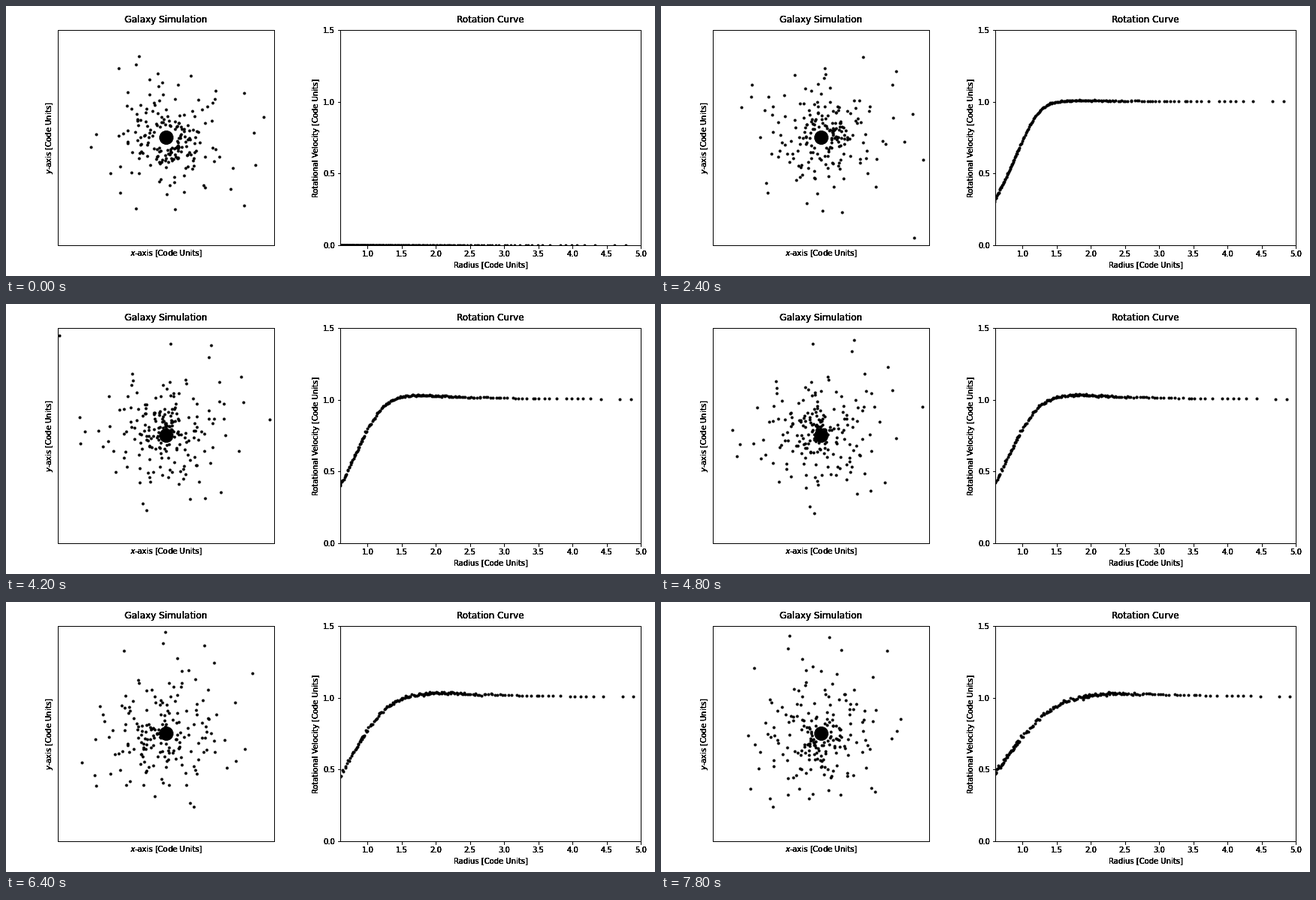
Write a matplotlib script that moves like this. It is 864 by 360 pixels and loops after 8 s.

```python
import numpy as np
import matplotlib.pyplot as plt
from matplotlib.animation import FuncAnimation

W, H, DPI = 864, 360, 72
FRAMES, INTERVAL, DT = 40, 200, 0.2
STARS = 200

plt.rcParams.update({"font.family": "DejaVu Sans", "font.size": 10})
rng = np.random.default_rng(12)

# The farthest stars: radius, angle in degrees
FAR = np.array([(6.71, 101), (6.32, -69), (4.78, -41), (4.62, 12),
                (4.33, -17), (4.18, 30), (4.07, 3), (3.99, 108)])


def start_state():
    """Exponential disc with a hole in the middle, plus the far stars."""
    inner = STARS - len(FAR)
    u = (np.arange(inner) + rng.random(inner)) / STARS
    r = 0.55 - 1.07 * np.log(1 - u)
    angle = rng.uniform(0, 2 * np.pi, inner)
    return np.append(r, FAR[:, 0]), np.append(angle, np.radians(FAR[:, 1]))


R0, ANGLE0 = start_state()
GAIN = 0.034 * np.clip((R0 - 0.95) / 0.55, 0, 1)
SINK = 0.75 * np.clip((0.9 - R0) / 0.3, 0, 1) ** 2
DRIFT = rng.normal(0, 0.009, STARS) * np.exp(-(R0 / 2.5) ** 4)


def radius(n):
    """Outer stars spiral out slowly, the core falls in and rebounds."""
    fall = np.interp(n, [0, 32, 39], [0, 1, 0.55]) ** 2
    return np.sqrt(R0 ** 2 + GAIN * n) * (1 - SINK * fall)


def speed(n, r):
    """Power-law rise into a flat curve; a low hump grows and moves out."""
    t = n / (FRAMES - 1)
    rise = (0.68 + 0.12 * np.sin(0.8 * np.pi * t) ** 2) * r ** (2 - 1.1 * t)
    flat = rise / (1 + rise ** 6) ** (1 / 6)
    height = 0.04 * np.clip((t - 0.15) / 0.35, 0, 1)
    hump = height * np.minimum(1, ((1.2 + 1.2 * t ** 1.5) / r) ** 2)
    return flat * (1 + hump) + DRIFT * t


def run():
    angle, states = ANGLE0.copy(), []
    for n in range(FRAMES):
        r = radius(n)
        v = speed(n, r)
        shown = v if n else np.zeros_like(v)
        states.append((r * np.cos(angle), r * np.sin(angle), r, shown))
        angle = angle + np.arctan(DT * v / r)
    return states


STATES = run()
fig = plt.figure(figsize=(W / DPI, H / DPI), dpi=DPI, facecolor="white")


def panel(name, left, width, title, xlabel, ylabel):
    ax = fig.add_axes([left / W, 41 / H, width / W, 287 / H], label=name)
    ax.patch.set_visible(False)
    ax.set_title(title, fontsize=12, pad=10)
    ax.set_xlabel(xlabel)
    ax.set_ylabel(ylabel)
    return ax


# Stacked layers darken the text edges
for layer in range(5):
    sky = panel(f"sky{layer}", 69, 288, "Galaxy Simulation",
                "$x$-axis [Code Units]", "$y$-axis [Code Units]")
    sky.set(xlim=(-5, 5), ylim=(-5, 5), xticks=[], yticks=[])
    graph = panel(f"graph{layer}", 445, 400, "Rotation Curve",
                  "Radius [Code Units]", "Rotational Velocity [Code Units]")
    graph.set(xlim=(0.6, 5), ylim=(0, 1.5),
              xticks=np.arange(1, 5.1, 0.5), yticks=np.arange(0, 1.6, 0.5))

sky.plot([0], [0], "ko", ms=18)
stars, = sky.plot([], [], "k.", ms=6)
dots, = graph.plot([], [], "k.", ms=6)


def update(n):
    x, y, r, v = STATES[n]
    stars.set_data(x, y)
    dots.set_data(r, v)
    return stars, dots


anim = FuncAnimation(fig, update, frames=FRAMES, interval=INTERVAL,
                     repeat=True, repeat_delay=0)
plt.show()
```
